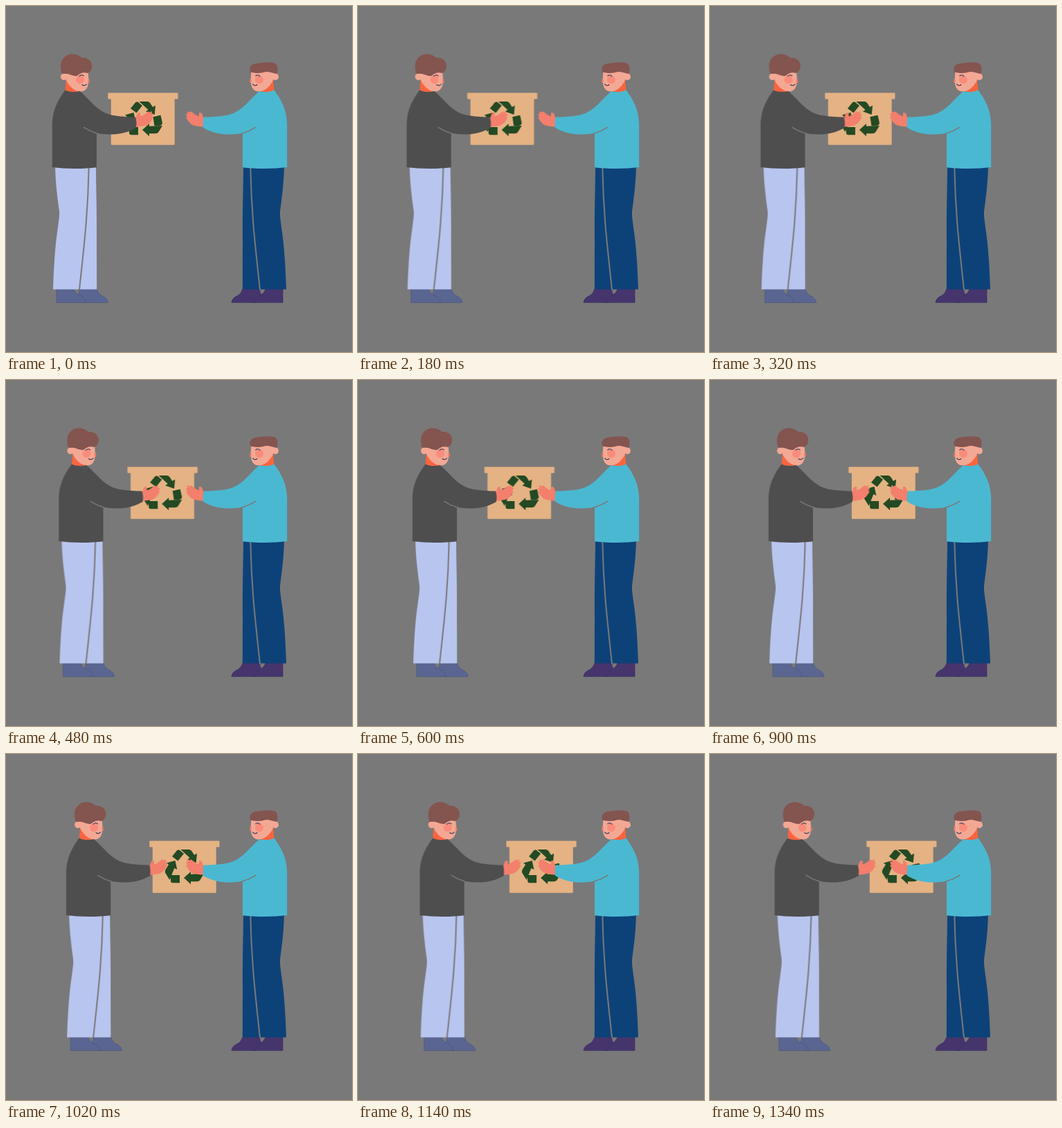
Write an HTML page that moves like this. It is 500 px wide and 500 px high and loops after 1360 ms.

```html
<!DOCTYPE html>
<html lang="en">
<head>
<meta charset="utf-8">
<title>Handing over a recycling box</title>
<style>
  html, body { margin: 0; width: 100%; height: 100%; overflow: hidden; background: #797979; }
  svg { display: block; width: 100vw; height: 100vh; }
  .giver { --top: #4e4e4e; --legs: #b8c5ef; --shoe: #5a6691; --sole: #485380; }
  .taker { --top: #4bb8d1; --legs: #0d4279; --shoe: #46356d; --sole: #3c2d62; }
  .hair { fill: #84544f; }
  .skin { fill: #f3a894; }
  .box { --shift: 80px; fill: #e5b283; }
  .giver { --shift: 26.9px; }
  .box, .giver { animation: carry 1360ms steps(68) infinite; }
  @keyframes carry {
    from { transform: translateX(0); }
    to { transform: translateX(var(--shift)); }
  }
</style>
</head>
<body>
<svg viewBox="0 0 500 500">
  <defs>
    <g id="body">
      <!-- shoes -->
      <g fill="var(--shoe)" stroke="var(--sole)" stroke-width=".7">
        <path d="M106 409H131C133 414 135 417 139 419C144 421 147 425 147 428.6H112L104 416.5C106 415 106.500 412 106 409Z"/>
        <path d="M73 409H98C100 414 102 416 106 418C112 420 115 424 116 428.600H73Z"/>
      </g>
      <!-- trousers -->
      <path fill="var(--legs)" d="M71 231H130C130 260 131.500 300 131 340L131.200 409.500H68C69 378 71 345 75 320C76 311 77.500 304 77 297C74 275 71.500 255 71 231Z"/>
      <path d="M119.700 233C118.500 300 113 345 106 410" fill="none" stroke="#797979" stroke-width="2"/>
      <!-- neck and head -->
      <path fill="#fb643f" d="M87 104L85.500 124H105L108 116Z"/>
      <ellipse class="skin" cx="83.800" cy="102.300" rx="4.800" ry="5"/>
      <path class="skin" d="M85 94H118.500C119 99 119 103 119.500 105L121 109Q121 111 119 111C118.500 119 114 124 107 123.500C99 123 91 116 87 107Z"/>
      <path fill="#f56f58" d="M118.700 104.500L121 109Q121 111 118.500 110.500Z"/>
      <circle cx="107" cy="106.500" r="6" fill="#f98c7c"/>
      <g fill="none" stroke="#273150" stroke-width="1.100" stroke-linecap="round">
        <path d="M106 101.500Q109 98.200 112.200 101"/>
        <path d="M110 113.800Q113.500 116.500 116.500 113"/>
      </g>
      <!-- hand -->
      <path fill="#f37f6c" d="M185 161.500L188 161C189 157 190 154 192.500 154C195 154 194 157 194 159.500C199 158 202 155 204.500 153Q207 151.800 207 154L210 152.300Q212 152.500 210.500 155L209.500 156.500L212 155.500Q213.800 156.500 212 158.500L210.500 160.500Q213.500 159.500 212.500 162C210 166 206 172 200 173C195 174 191 174.500 186 174.500Z"/>
      <!-- sweater -->
      <path fill="var(--top)" d="M85.500 121.500C91 124.500 100 125 106.500 123C113 128 119 135 125 141C135 151 145 157 158 158.500C168 160 178 160.500 187 160.500C188.500 165 189 170 188 176C176 183 162 186 148 185.500C142 185.500 136 184.800 131 183.500V233.200C112 235.600 86 235.600 66.800 233V172C66.800 151 75 136 85.500 121.500Z"/>
      <path d="M112 175.200Q121 181 131.500 184" fill="none" stroke="#797979" stroke-width="1.600"/>
    </g>
  </defs>

  <g class="box">
    <path d="M148.500 125.500H247.500Q248.500 125.500 248.500 126.500V133.500Q248.500 134.500 247.500 134.500H243.700V199.500Q243.700 200.700 242.500 200.700H153Q151.800 200.700 151.800 199.500V134.500H148.500Q147.300 134.500 147.300 133.500V126.500Q147.300 125.500 148.500 125.500Z"/>
    <g fill="#234a23">
      <path d="M180 148L187 139.500Q189 138 191 139L197 144L188.500 154.500Z"/>
      <path d="M192.500 138H204.500Q207 138 208.500 140.500L212 146L216 143.800L214.800 157L202 152.500L205.500 150Z"/>
      <path d="M212.500 160.300L223.500 157.700L226 169Q225.500 172.500 222 173L214.500 173.300Z"/>
      <path d="M226 173L220.500 182Q219 184.300 216 184.300H207V188.300L197 179L207 170V173.800Z"/>
      <path d="M178 175H191V186.200H181Q177.800 186 178 183Z"/>
      <path d="M172 157.500L184.500 154L187.300 167L183.300 165L176.500 182L170 171.500Q169.500 169 170.500 167L175 160Z"/>
    </g>
  </g>

  <g class="giver">
    <use href="#body"/>
    <path class="hair" d="M81 98C79.500 95 79 91 79 87C79 77 86 69.500 96 69.500C102 69.500 107 72 109.500 75C117 74 124.300 79 124.300 87C124 92 121.500 95.500 118 97C112 95 107 97 103.500 100.500C98 103 92 97.500 86 97.800Z"/>
  </g>

  <g class="taker">
    <use href="#body" transform="translate(473) scale(-1 1)"/>
    <path class="hair" d="M353 95.500C351 89 354 83.500 363 83C372 81.500 382 80.800 389 83C393 86 393 92 391.500 98C386 97 381 95 376 95C368 97.500 360 97.500 353 95.500Z"/>
  </g>
</svg>
</body>
</html>
```
